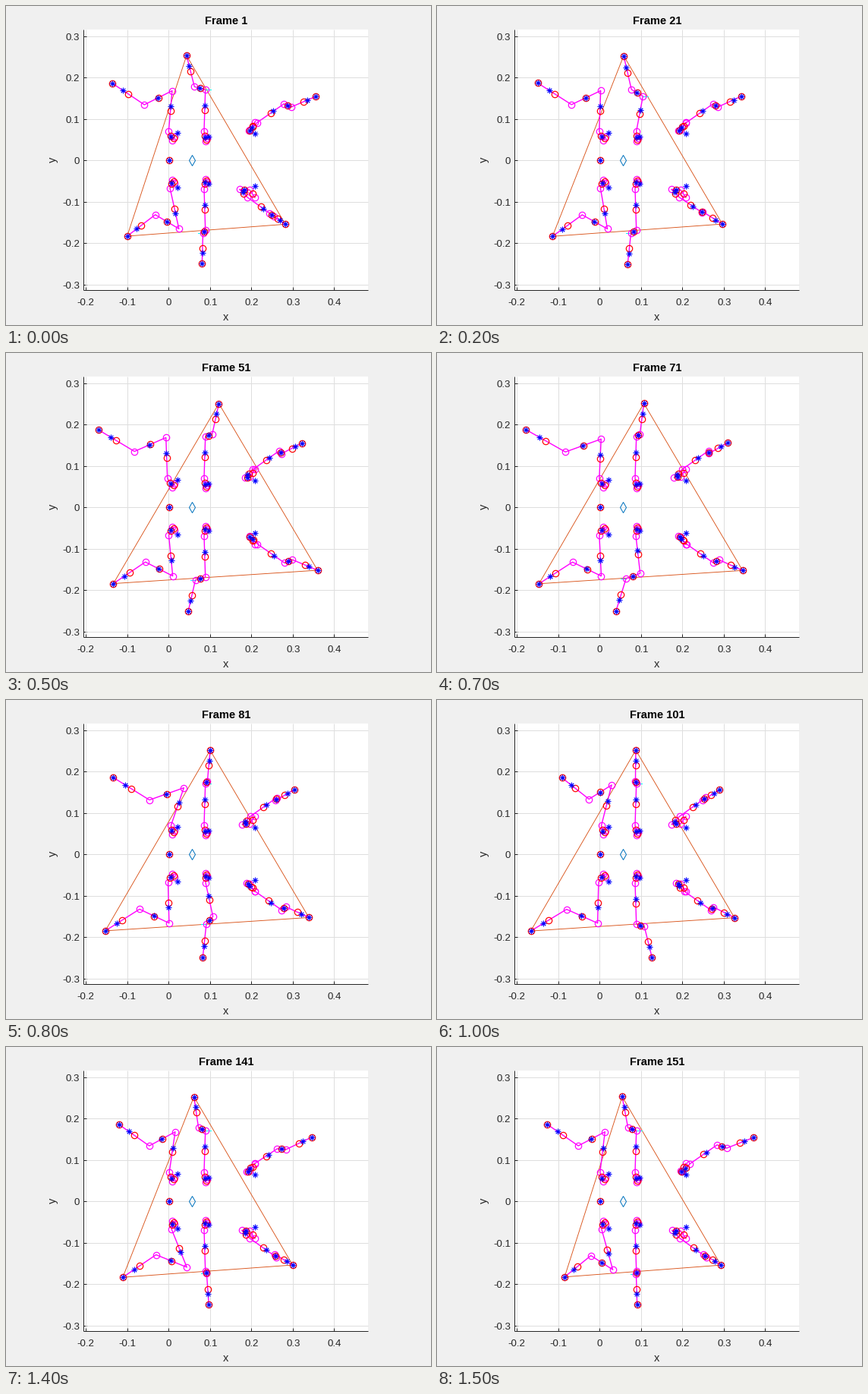
Animation, 560 px wide and 420 px high, one loop 1600 ms. Source, as a matplotlib script:

```python
from collections import namedtuple
from itertools import pairwise

import numpy as np
import matplotlib.pyplot as plt
from matplotlib.animation import FuncAnimation
from matplotlib.patches import Rectangle

FRAMES, STEP_MS = 16, 100
PERIOD = 16.5                       # gait period, in frames
SWING_START, SWING_END = 1, 4       # part of the period with the foot lifted
MID, REACH = 259.2, 27.5            # centre and half length of the stride
PX = 0.72                           # one pixel in points at 100 dpi
X0, Y0, UNIT = 214.7, 202.6, 54.57  # plot origin and pixels per 0.1
LEFT, RIGHT, TOP, BOTTOM = 102, 477, 31, 374
BLUE, ORANGE = (0, 0.447, 0.741), (0.85, 0.325, 0.098)
INK, GRID = (0.15, 0.15, 0.15), "#dedede"

# path: hip to foot in mid stride, as x and distance from the body axis
# follow: how far each point goes along with the foot
# lift: shift of the knee at the top of the swing
Leg = namedtuple("Leg", "path follow lift tip")
BACK = Leg([(222.3, 30.5), (219, 26), (214.4, 37.4), (219.3, 91), (183, 72.6), (140.6, 101)],
           [0, 0, 0.09, 0.45, 0.72, 1], (15, -4), (225.5, 36))
MIDDLE = Leg([(265.3, 29), (263, 25), (261, 38), (262.7, 92.5), (260, 96), (MID, 136.7)],
             [0, 0, 0, 0, 0.55, 1], (10, -10), (266.5, 31))
FRONT = Leg([(328, 49.5), (321, 39.5), (314.3, 38.7), (324.9, 49.2), (360, 74), (362.2, 70), (389.3, 84.1)],
            [0, 0, 0.31, 0.31, 0.33, 0.71, 1], (-8, -6), (327.5, 34.7))

# leg, side of the body, phase lag, place of the mass on the thigh
THIRD = PERIOD / 3
LEGS = [(MIDDLE, -1, 0, 0.61), (FRONT, 1, 0, 0.61), (BACK, 1, 2 * THIRD, 0.61),
        (BACK, -1, THIRD, 0.61), (MIDDLE, 1, THIRD, 0.39), (FRONT, -1, 2 * THIRD, 0.61)]

plt.rcParams["font.family"] = "Liberation Sans"
fig = plt.figure(figsize=(5.6, 4.2), dpi=100, facecolor="#f0f0f0")
ax = fig.add_axes([0, 0, 1, 1])
ax.set_xlim(0, 560)
ax.set_ylim(420, 0)
ax.axis("off")


def stride(p):
    """Offset of the foot from mid stride and its lift at gait phase p."""
    if SWING_START < p < SWING_END:
        t = (p - SWING_START) / (SWING_END - SWING_START)
        return REACH * (2 * t * t * (3 - 2 * t) - 1), np.sin(np.pi * t)
    # steady push back, quicker just after landing and before take-off
    stance = PERIOD - SWING_END + SWING_START
    e = 2 * ((p - SWING_END) % PERIOD) / stance - 1
    return -24 * e - (REACH - 24) * e ** 9, 0


def chain(leg, side, p):
    """Points from the hip to the foot, in pixels."""
    v, lift = stride(p)
    pts = np.array(leg.path, float)
    pts += np.outer(leg.follow, [v, -0.03 * v])
    knee = lift * np.array(leg.lift)
    pts[-3] += knee
    pts[-2] += 0.4 * knee
    pts[2:-3, 0] += 0.2 * knee[0]
    pts[:, 1] = Y0 + side * pts[:, 1]
    return pts


def line(color, width, z):
    return ax.plot([], [], color=color, lw=width * PX, zorder=z)[0]


def marks(marker, color, size, z, width):
    return ax.plot([], [], ls="none", marker=marker, ms=size * PX, mfc="none",
                   mec=color, mew=width * PX, zorder=z)[0]


def rule(xs, ys, color):
    ax.plot(xs, ys, color=color, lw=PX, solid_capstyle="butt")


def label(x, y, text, size=13.3, **style):
    style = dict(ha="center", va="baseline", color=INK) | style
    return ax.text(x, y, text, size=size * PX, **style)


def draw_axes():
    ax.add_patch(Rectangle((LEFT, TOP), RIGHT - LEFT, BOTTOM - TOP,
                           fc="white", ec="none", antialiased=False))
    for i in range(-3, 5):
        text = f"{i / 10:.1f}" if i else "0"
        x, y = int(X0 + UNIT * i), int(Y0 + 0.2 - UNIT * i) + 1
        if i > -3:
            rule([x, x], [TOP, BOTTOM], GRID)
            rule([x, x], [BOTTOM, BOTTOM - 4], INK)
            label(x + 0.3, 393.5, text)
        if i < 4:
            rule([LEFT, RIGHT], [y, y], GRID)
            rule([LEFT, LEFT + 4], [y, y], INK)
            label(97, y + 4.8, text, ha="right")
    rule([LEFT, LEFT], [TOP, BOTTOM], INK)
    rule([LEFT, RIGHT], [BOTTOM, BOTTOM], INK)
    label(290, 413.5, "x", 14.67)
    label(62, 202.5, "y", 14.67, va="center", rotation=90)


draw_axes()
title = label(290.3, 24.3, "", 14.67, weight="bold", color="black")
support = line(ORANGE, 0.9, 3)
limbs = [line("magenta", 1.4, 5) for _ in LEGS]
dashes = line("cyan", 1, 4)
centre = marks("d", BLUE, 9.5, 4, 1)
centre.set_data([244.5], [202.5])
joints = marks("o", "magenta", 8.4, 6, 1.2)
middles = marks("o", "red", 8.4, 7, 1.2)
masses = marks((8, 2, 0), "blue", 7.6, 8, 0.9)


def show(artist, pts):
    artist.set_data(*np.transpose(pts))


def update(k):
    title.set_text(f"Frame {10 * k + 1}")
    knots, mids, stars, feet, ticks = [], [(X0, Y0)], [(X0, Y0)], [], []
    for (leg, side, lag, thigh), limb in zip(LEGS, limbs):
        pts = chain(leg, side, (k - lag) % PERIOD)
        foot = pts[-1]
        show(limb, pts)
        knots.extend(pts[:-1])
        feet.append(foot)
        mids += [(a + b) / 2 for a, b in pairwise(pts)] + [foot]
        links = list(pairwise(pts[1:]))
        parts = [0.5, 0.36, thigh, 0.52, 0.66][-len(links):]
        stars += [a + part * (b - a) for (a, b), part in zip(links, parts)]
        stars += [(leg.tip[0], Y0 + side * leg.tip[1]), foot]
        if leg is MIDDLE:
            start = pts[-2] if side > 0 else pts[-3]
            ticks += [start, start - (7 * side, 0), (np.nan, np.nan)]
    show(support, feet[:3] + feet[:1])
    show(joints, knots)
    show(middles, mids)
    show(masses, stars)
    show(dashes, ticks)
    return []


anim = FuncAnimation(fig, update, frames=FRAMES, interval=STEP_MS,
                     init_func=lambda: update(0), repeat=True, repeat_delay=0)
plt.show()
```
